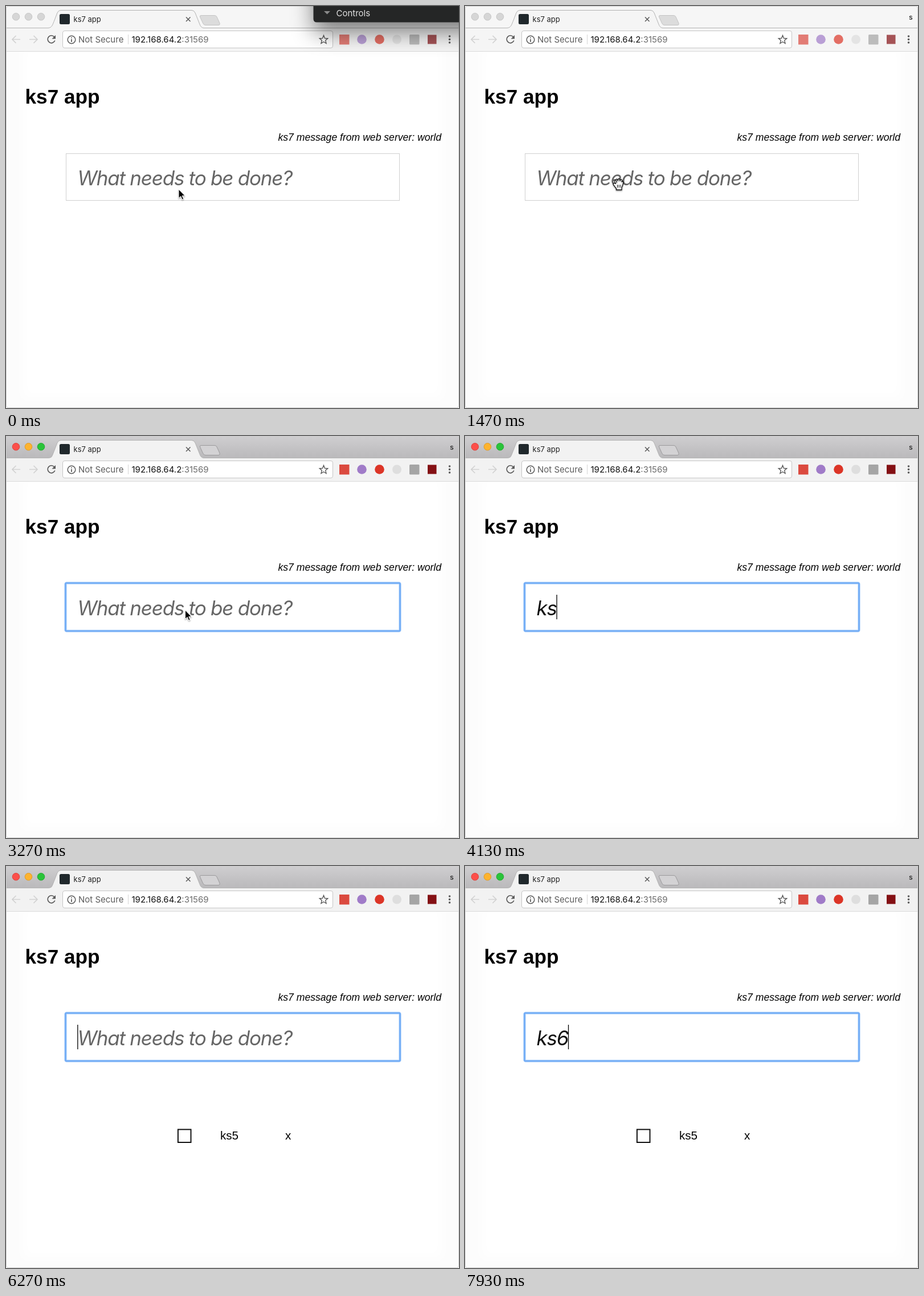
An HTML page that plays this animation: 795 by 704 pixels, repeating every 8000 ms.

```html
<!DOCTYPE html>
<html lang="en">
<head>
<meta charset="utf-8">
<title>ks7 app</title>
<style>
html, body { margin: 0; width: 100%; height: 100%; overflow: hidden; background: #fff; }
svg { display: block; width: 795px; height: 704px; }
text { white-space: pre; font-optical-sizing: none; }
.ui { font-family: Inter, sans-serif; font-size: 15px; }
.page { font-family: "Liberation Sans", Arial, sans-serif; }
.entry { font: italic 35px Inter, sans-serif; font-optical-sizing: none; letter-spacing: -.035em; }
.line { fill: none; stroke: #5a5a5a; stroke-width: 1.7; }
.strip { fill: #f6f6f6; }
.bar { fill: #f5f5f5; }
.newtab { fill: #dcdcdc; stroke: #c4c4c4; }
.light { fill: #d6d6d6; stroke: #c6c6c6; }
.icons { opacity: .7; }
.active .strip { fill: url(#steel); }
.active .bar { fill: #f2f2f2; }
.active .newtab { fill: #d3d2d4; stroke: #9c9b9d; }
.active .light { fill: var(--on); stroke: var(--rim); }
.active .icons { opacity: 1; }
</style>
</head>
<body>
<svg id="stage" viewBox="0 0 795 704">
  <defs>
    <linearGradient id="steel" x2="0" y2="1">
      <stop stop-color="#cfced0"/><stop offset="1" stop-color="#bab9bb"/>
    </linearGradient>
    <filter id="soft" x="-20%" y="-20%" width="140%" height="140%"><feGaussianBlur stdDeviation="8"/></filter>
    <filter id="shade" x="-50%" y="-300%" width="200%" height="700%"><feGaussianBlur stdDeviation="19"/></filter>
    <filter id="drop" x="-50%" y="-50%" width="200%" height="200%">
      <feDropShadow dx="0" dy="1.5" stdDeviation="1.2" flood-opacity=".4"/>
    </filter>
  </defs>

  <!-- page -->
  <rect width="795" height="704" fill="#fcfcfc"/>
  <rect x="30" y="70" width="735" height="615" fill="#fff" filter="url(#soft)"/>
  <g class="page">
    <text x="33.5" y="171" font-size="35.2" font-weight="bold">ks7 app</text>
    <text x="764" y="235.5" font-size="17.6" font-style="italic" text-anchor="end">ks7 message from web server: world</text>
    <g id="item" font-size="20.6">
      <rect x="301.9" y="461.4" width="22.6" height="22.6" fill="#fff" stroke="#111" stroke-width="2"/>
      <text x="376" y="479">ks5</text><text x="490" y="479">x</text>
    </g>
  </g>
  <rect x="105.5" y="258.5" width="585" height="82" fill="#fff" stroke="#d0d0d0"/>
  <g id="focus" fill="none">
    <rect x="104.5" y="257.5" width="587" height="84" rx="2" stroke="#b9d7fb" stroke-width="4.5"/>
    <rect x="104.5" y="257.5" width="587" height="84" rx="1.5" stroke="#6fabf5" stroke-width="2.6"/>
  </g>
  <text id="entry" class="entry" x="125.5" y="314"></text>
  <rect id="caret" y="278" width="1.3" height="43"/>

  <!-- browser frame -->
  <rect class="strip" width="795" height="39"/>
  <path class="bar" d="M0 38.5H77C82 38 82 32 85 25L90 12Q92 8 96 8H326Q330 8 332 12L340 32Q342 38 347 38.5H795V79H0Z"/>
  <path d="M0 38.5H74C81 38 82 32 85 25L90 12Q92 7.5 96 7.5H326Q330 7.5 332 12L340 32Q342 38 347 38.5H795" fill="none" stroke="#b3b3b3"/>
  <path d="M0 79.5H795" stroke="#dadada"/>
  <path class="newtab" d="M342 16.5H366Q369 16.5 370 19L375 30Q376 33.5 373 33.5H350Q347 33.5 345.5 30L340.5 19Q340 16.5 342 16.5Z"/>
  <circle class="light" cx="17.5" cy="18.8" r="6.3" style="--on:#fc4f4a;--rim:#df3f3a"/>
  <circle class="light" cx="39.5" cy="18.8" r="6.3" style="--on:#fdb32e;--rim:#de9b28"/>
  <circle class="light" cx="61.5" cy="18.8" r="6.3" style="--on:#2ac43a;--rim:#23a830"/>
  <rect x="94" y="14" width="18" height="18" rx="2.5" fill="#20282c"/>
  <g class="ui" fill="#222">
    <text x="118.5" y="27.5" style="font-size:13px">ks7 app</text>
    <text x="779" y="24" style="font-size:12.5px" font-weight="500">s</text>
  </g>
  <path class="line" d="M316 19.5l7.5 7.5m0-7.5l-7.5 7.5" style="stroke-width:1.5"/>
  <path class="line" d="M25 58.5H11m6.5-6.5l-6.5 6.5 6.5 6.5M41 58.5H55m-6.5-6.5l6.5 6.5-6.5 6.5" style="stroke:#d2d2d2"/>
  <path class="line" d="M85 54.5A6.5 6.5 0 1 0 85.8 60.5"/>
  <path d="M87 51V57.5H80.5Z" fill="#5a5a5a"/>

  <!-- address field -->
  <rect x="99.5" y="43.5" width="474" height="30" rx="3.5" fill="#fff" stroke="#c6c6c6"/>
  <circle class="line" cx="115" cy="59" r="6.8" style="stroke-width:1.5"/>
  <path class="line" d="M115 58V63M115 54.7V56.5"/>
  <path d="M214.5 50V67" stroke="#d4d4d4"/>
  <g class="ui">
    <text x="127" y="64.3" fill="#5c5c5c">Not Secure</text>
    <text x="220.5" y="64.3" fill="#111">192.168.64.2<tspan fill="#6c6c6c">:31569</tspan></text>
  </g>
  <path class="line" d="M557.5 51.5l2 5 5.2.4-4 3.4 1.3 5.2-4.5-2.8-4.5 2.8 1.3-5.2-4-3.4 5.2-.4Z" style="stroke-width:1.4"/>
  <g class="icons">
    <rect x="585" y="50" width="17.5" height="17.5" fill="#db4a3f"/>
    <circle cx="624.5" cy="58.5" r="8.3" fill="#a07bc8"/>
    <circle cx="655.5" cy="58.5" r="8.3" fill="#dc3527"/>
    <circle cx="686" cy="58.5" r="8" fill="#dedede"/>
    <rect x="708" y="50" width="17.5" height="17.5" rx="1.5" fill="#a5a5a5"/>
    <rect x="740" y="50.5" width="15.5" height="16" fill="#841014"/>
  </g>
  <g fill="#5a5a5a">
    <circle cx="778.5" cy="53" r="1.8"/><circle cx="778.5" cy="58.5" r="1.8"/><circle cx="778.5" cy="64" r="1.8"/>
  </g>
  <rect x=".5" y=".5" width="794" height="703" rx="3" fill="none" stroke="#cfcfcf"/>

  <g id="panel">
    <rect x="540" y="-60" width="320" height="106" fill="#000" opacity=".5" filter="url(#shade)"/>
    <path d="M539.5 0V22.5Q539.5 28.5 545.5 28.5H795V0Z" fill="#252626"/>
    <path d="M558 9H569L563.5 14.5Z" fill="#8b8b8b"/>
    <text class="ui" x="579.5" y="18" fill="#e2e2e2">Controls</text>
  </g>

  <!-- pointers, drawn from their hot spot -->
  <path id="arrow" d="M0 0V15.5L3.7 12.2 6.2 18 8.7 17 6.2 11.3H11Z" fill="#000" stroke="#fff" stroke-width="1" filter="url(#drop)"/>
  <g id="hand" filter="url(#drop)">
    <path d="M-4-.5C-6.500-4-8-7-6-7.500S-3.500-4-3-3.500C-4-7-4.500-8.500-3-9S-.8-6-.5-5C-.5-8-.5-9.500 1-9.500S2.800-8 3-5C3.500-7.500 4-9 5.500-8.500S6-5.500 6-3.500C7-5.500 8-6 8.500-4.500 9 0 7.500 3 6 6V10H-3.500V7.500C-6 5-7.500 2-9 .5-9.500-2-6.500-2-4-.5Z" fill="#fff" stroke="#111" stroke-width="1.3"/>
    <path d="M-1.500 1V6M1.200 1V6M4 1V6" stroke="#111"/>
  </g>
</svg>
<script>
const LOOP = 8000;
const $ = id => document.getElementById(id);
const show = (id, on) => $(id).style.display = on ? "" : "none";

const ACTIVATE = 2900, SUBMIT = 5850, PANEL_CLOSE = 100;
const PLACEHOLDER = "What needs to be done?";
// time and field content after each key press
const keys = [[0, ""], [3950, "k"], [4130, "ks"], [5000, "ks5"], [SUBMIT, ""], [7200, "k"], [7360, "ks"], [7640, "ks6"]];
// pointer, start and end time, start and end position
const moves = [
  ["arrow", 0, 70, 303, 321, 303, 321],
  ["arrow", 70, 200, 303, 321, 308, 376],
  ["hand", 1000, 1350, 296, 384, 269, 312],
  ["hand", 1350, 2730, 269, 312, 269, 312],
  ["arrow", 2730, 3000, 269, 306, 314.5, 305],
  ["arrow", 3000, 3650, 314.5, 305, 314.5, 305],
  ["arrow", 3650, 3950, 314.5, 305, 326, 482]
];

function draw(t) {
  const active = t >= ACTIVATE;
  $("stage").classList.toggle("active", active);
  show("panel", t < PANEL_CLOSE);
  show("focus", active);
  show("item", t >= SUBMIT);

  const [pressed, typed] = keys.filter(([at]) => at <= t).pop();
  const entry = $("entry");
  entry.textContent = typed || PLACEHOLDER;
  entry.setAttribute("fill", typed ? "#111" : "#666");
  const idle = t - Math.max(pressed, ACTIVATE - 200);
  show("caret", active && idle % 1000 < 500);
  $("caret").setAttribute("x", 125.2 + (typed && entry.getComputedTextLength()));

  show("arrow", false);
  show("hand", false);
  const move = moves.find(([, from, to]) => t >= from && t < to);
  if (move) {
    const [id, from, to, x0, y0, x1, y1] = move;
    const p = (t - from) / (to - from), e = p * p * (3 - 2 * p);
    show(id, true);
    $(id).setAttribute("transform", `translate(${x0 + (x1 - x0) * e} ${y0 + (y1 - y0) * e})`);
  }
}

const start = performance.now();
function tick(now) {
  draw(Math.max(0, now - start) % LOOP);
  requestAnimationFrame(tick);
}
draw(0);
requestAnimationFrame(tick);
</script>
</body>
</html>
```
